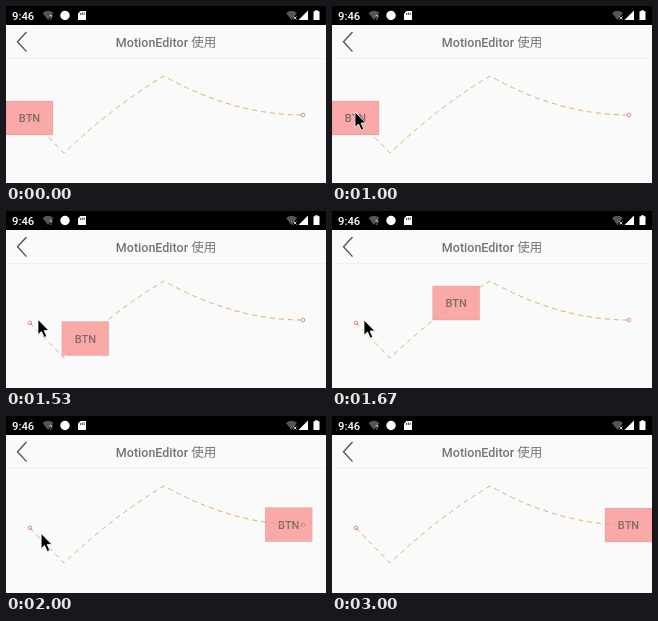
An HTML page that plays this animation: 320 px wide and 177 px high, repeating every 4110 ms.

```html
<!DOCTYPE html>
<html lang="zh">
<head>
<meta charset="utf-8">
<title>MotionEditor</title>
<style>
html, body { margin: 0; width: 100%; height: 100%; overflow: hidden; background: #fafafa; }
svg { display: block; width: 100vw; height: 100vh; }
text { font-family: Roboto, "Noto Sans CJK SC", "Noto Sans CJK", sans-serif; font-weight: 500; }
</style>
</head>
<body>
<svg viewBox="0 0 320 177" preserveAspectRatio="none">
  <rect width="320" height="177" fill="#fafafa"/>
  <rect y="52" width="320" height="1" fill="#f0f0f0"/>

  <!-- status bar -->
  <rect width="320" height="19" fill="#000"/>
  <text x="6" y="14" font-size="11.3" fill="#fff">9:46</text>
  <path d="M36.5 7Q42 2.6 47.5 7L42 14Z" fill="#555"/>
  <text x="43.3" y="14" font-size="7" fill="#ddd">?</text>
  <circle cx="59" cy="9.5" r="4.7" fill="#fff"/>
  <path d="M74.5 5H80V14H72V7.5Z" fill="#fff"/>
  <path d="M74.6 7v2M76.4 6.5v2.5M78.2 6.5v2.5" stroke="#000" stroke-width=".7"/>
  <path d="M280 7Q285.500 2.600 291 7L285.500 14Z" fill="#555"/>
  <path d="M287.500 10.500l3 3m0-3l-3 3" stroke="#ddd" stroke-width=".9"/>
  <path d="M302 4.500V14H292.500Z" fill="#fff"/>
  <path d="M309.200 4.200h2.600v1.100h1.700V14h-6V5.300h1.700Z" fill="#fff"/>

  <!-- title bar -->
  <path d="M20.500 26L11.500 35.800L20.500 45.600" fill="none" stroke="#555" stroke-width="1.4"/>
  <text x="160" y="41" font-size="12.5" fill="#747474" text-anchor="middle">MotionEditor 使用</text>

  <g id="btn">
    <rect x="-23.500" y="-17" width="47" height="34" fill="#faa9a9" stroke="#000" stroke-opacity=".09" stroke-width=".8"/>
    <text y="4" font-size="11" fill="#806a6a" text-anchor="middle">BTN</text>
  </g>

  <g fill="none">
    <path d="M24 112L58 147Q108 99.500 158 70Q227.500 109 297 109" stroke="#e2ad68" stroke-width="1" stroke-dasharray="5 4"/>
    <g stroke="#d98484" stroke-width=".9">
      <circle cx="24" cy="112" r="1.8"/>
      <circle cx="297" cy="109" r="1.8"/>
    </g>
  </g>

  <path id="cursor" d="M0 0V15.200L3.500 12L6.200 18L8.700 16.900L6.100 11H10.800Z" fill="#000" stroke="#fff" stroke-width=".8"/>
</svg>
<script>
const LOOP = 4110, STEP = 100 / 3;
const btn = document.getElementById('btn');
const cursor = document.getElementById('cursor');

const clamp = v => Math.min(1, Math.max(0, v));
const lerp = (a, b, k) => a + (b - a) * k;
const span = (t, a, b) => clamp((t - a) / (b - a));
const smooth = k => (1 - Math.cos(Math.PI * k)) / 2;
const easeOut = k => 1 - (1 - k) ** 2;
const place = (el, [x, y]) => el.setAttribute('transform', `translate(${x.toFixed(2)} ${y.toFixed(2)})`);

// Button centre: straight drop, arched climb, then a decelerating glide
function btnAt(t) {
  const p = smooth(span(t, 1260, 2260));
  if (p < 0.09) {
    const u = p / 0.09;
    return [lerp(23.5, 58, u), lerp(112, 147, u)];
  }
  if (p < 0.5) {
    const k = (p - 0.09) / 0.41;
    const u = k + 0.06 * k * (1 - k);
    return [lerp(58, 158, u), lerp(147, 70, u) - 18 * u * (1 - u)];
  }
  const u = easeOut((p - 0.5) / 0.5);
  return [lerp(158, 296.5, u), lerp(70, 109, easeOut(u))];
}

// Pointer tip: enters from below, clicks, drifts right, leaves
function cursorAt(t) {
  if (t < 1260) {
    const k = easeOut(span(t, 470, 830));
    return [lerp(65, 23, k), lerp(178, 106, k)];
  }
  if (t < 1860) {
    return [lerp(23, 32, span(t, 1250, 1365)), lerp(106, 109, span(t, 1250, 1600))];
  }
  const k = span(t, 1860, 2265) ** 2;
  return [lerp(32, 58, k), lerp(109, 180, k)];
}

function draw(time) {
  const t = Math.floor((time % LOOP + 5) / STEP) * STEP;
  place(btn, btnAt(t));
  place(cursor, cursorAt(t));
  const shown = t > 490 && t < 2265;
  cursor.setAttribute('visibility', shown ? 'visible' : 'hidden');
}

const start = performance.now();
function tick() {
  draw(performance.now() - start);
  requestAnimationFrame(tick);
}
tick();
</script>
</body>
</html>
```
